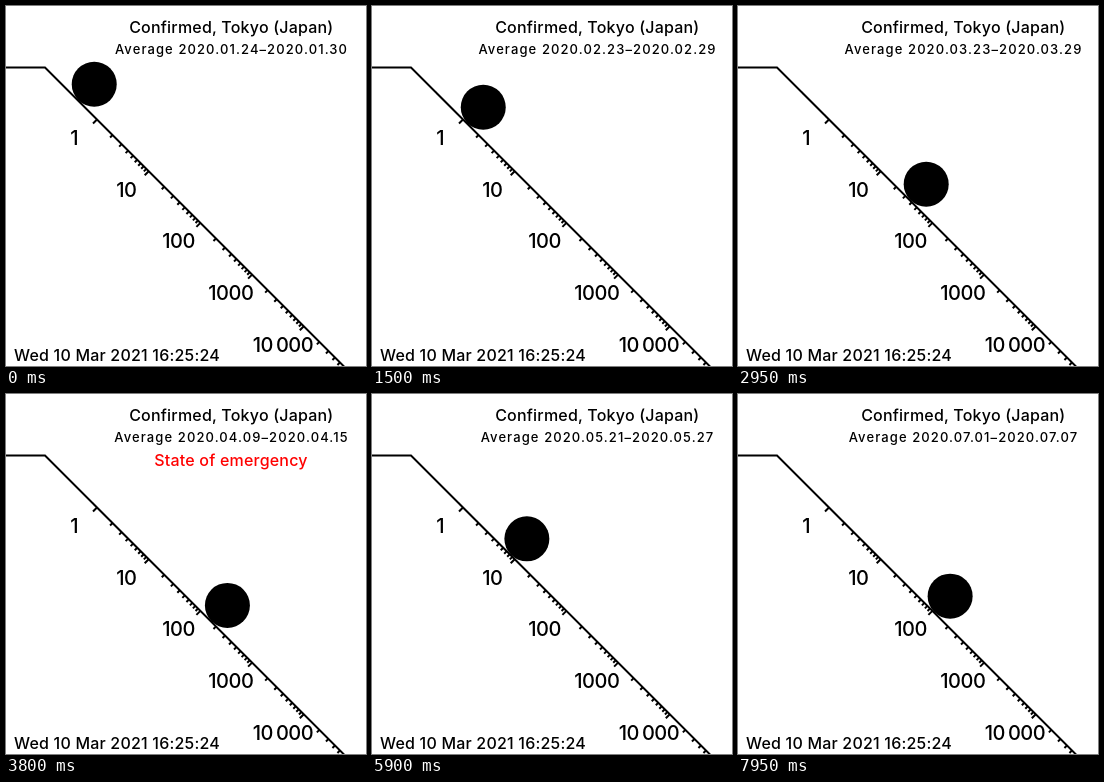
Animation, 360 px wide and 360 px high, one loop 8 s. Source, as an HTML page:

```html
<!DOCTYPE html>
<html lang="en">
<head>
<meta charset="utf-8">
<title>Confirmed cases on a log slope</title>
<style>
  html, body { margin: 0; width: 100%; height: 100%; overflow: hidden; background: #fff; }
  svg { display: block; width: 100vw; height: 100vh; }
  text { font: 500 16px Inter, sans-serif; letter-spacing: .2px; }
  .mid { text-anchor: middle; }
  .range { font-size: 13px; letter-spacing: 1.1px; }
  .label { font-size: 20px; letter-spacing: -.5px; }
  path { fill: none; stroke: #000; stroke-width: 2; }
</style>
</head>
<body>
<svg viewBox="0 0 360 360">
  <path d="M0 61.5H39L338.5 361"/>
  <path id="ticks"/>
  <g id="labels"></g>
  <text class="mid" x="225.3" y="27">Confirmed, Tokyo (Japan)</text>
  <text class="mid range" id="range" x="225.5" y="48"></text>
  <text class="mid" id="alert" x="225" y="72" fill="#f00">State of emergency</text>
  <text x="8" y="355">Wed 10 Mar 2021 16:25:24</text>
  <circle id="ball" r="22.5"/>
</svg>
<script>
const $ = id => document.getElementById(id);
const STEP = 50, DAYS = 160, DAY = 864e5;
const START = Date.UTC(2020, 0, 24);
const ALERT_FROM = Date.UTC(2020, 3, 7), ALERT_TO = Date.UTC(2020, 4, 25);
const ONE = 91, DECADE = 51.7, DROP = 22.5, GAP = 16.25;

// Turning points of the weekly total: [day, cases]; growth between them is exponential.
const turns = [
  [0, 3], [2, 1], [6, 1], [7, 0], [13, 0], [14, 1], [17, 16], [22, 22],
  [24, 11], [28, 10], [32, 7], [37, 27], [41, 28], [43, 19], [50, 50], [52, 48],
  [58, 227], [64, 484], [70, 862], [75, 1150], [83, 1000], [91, 590], [95, 700],
  [98, 620], [103, 200], [106, 150], [114, 43], [119, 63], [129, 147],
  [135, 127], [138, 211], [142, 250], [144, 222], [152, 386], [159, 748]
];

function total(day) {
  const i = Math.max(1, turns.findIndex(([d]) => d >= day));
  const [d0, a] = turns[i - 1], [d1, b] = turns[i];
  const k = (day - d0) / (d1 - d0);
  return a ** (1 - k) * b ** k;
}

const slopeX = value => ONE + DECADE * Math.log10(value);
const format = time => new Date(time).toISOString().slice(0, 10).replaceAll("-", ".");

function buildAxis() {
  let d = "";
  ["1", "10", "100", "1000", "10\u2009000"].forEach((name, i) => {
    for (let n = 1; n < 10; n++) {
      const x = slopeX(n * 10 ** i), size = n === 1 ? 4 : 2.5;
      d += `M${x} ${x + DROP}l${-size} ${size}`;
    }
    const label = document.createElementNS("http://www.w3.org/2000/svg", "text");
    label.setAttribute("class", "mid label");
    label.setAttribute("x", 68.2 + i * 52.2);
    label.setAttribute("y", 139 + i * DECADE);
    label.textContent = name;
    $("labels").append(label);
  });
  $("ticks").setAttribute("d", d);
}

function draw(ms) {
  const day = Math.floor(ms / STEP) % DAYS;
  const from = START + day * DAY, to = from + 6 * DAY;
  const sum = total(day);
  const x = slopeX(sum / 7);
  $("ball").setAttribute("cx", sum ? x + GAP : 27.5);
  $("ball").setAttribute("cy", sum ? x + DROP - GAP : 38.5);
  $("range").textContent = `Average ${format(from)}–${format(to)}`;
  $("alert").setAttribute("visibility", to >= ALERT_FROM && to <= ALERT_TO ? "visible" : "hidden");
}

buildAxis();
draw(0);
const t0 = performance.now();
requestAnimationFrame(function tick() {
  draw(performance.now() - t0);
  requestAnimationFrame(tick);
});
</script>
</body>
</html>
```
